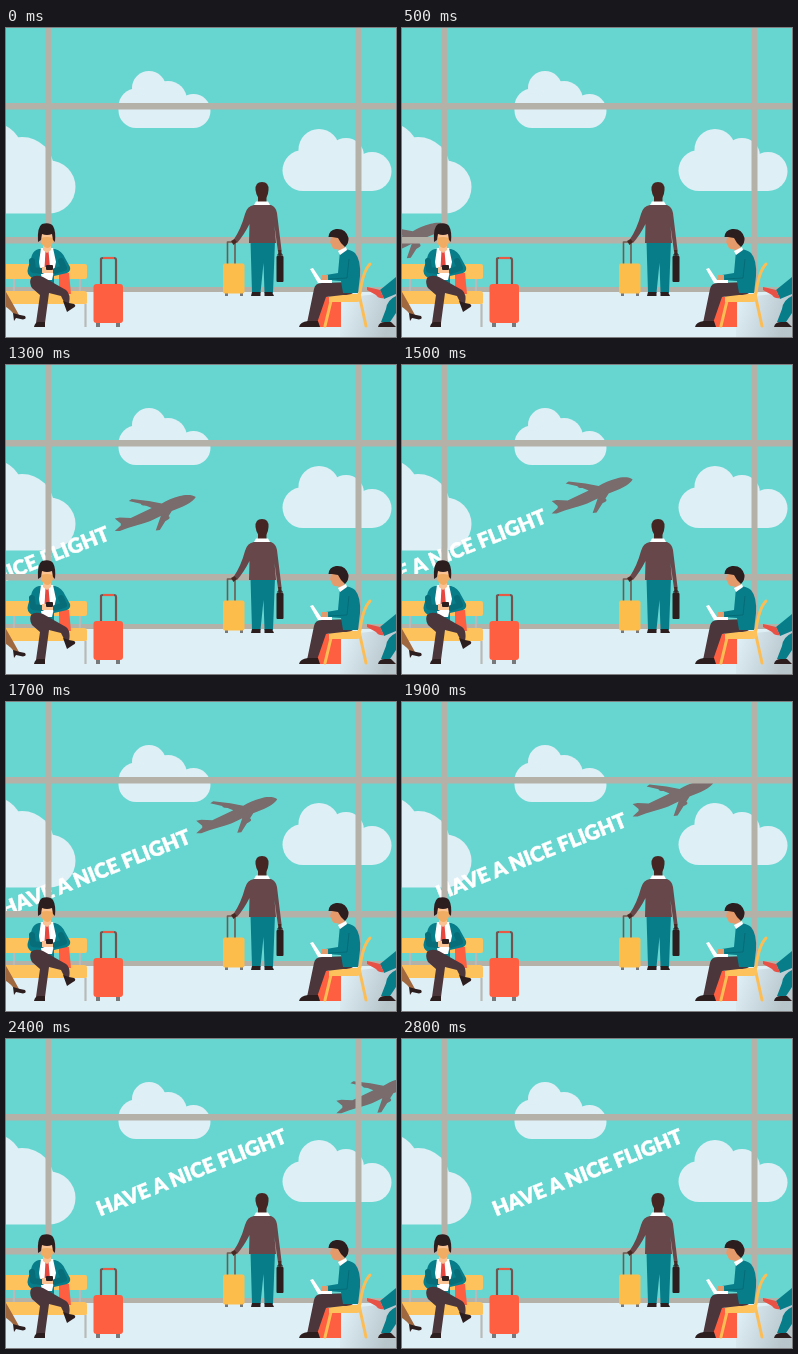
These frames come from a looping animation (390 px wide and 309 px high, 3100 ms). An HTML page:

```html
<!DOCTYPE html>
<html lang="en">
<head>
<meta charset="utf-8">
<title>Have a nice flight</title>
<style>
  html, body { margin: 0; width: 100%; height: 100%; overflow: hidden; background: #67d6d0; }
  svg { display: block; width: 390px; height: 309px; }
  .cloud { fill: #dfeff6; }
  .teal { fill: #087d8a; }
  .dark { fill: #2c1d1f; }
  .brown { fill: #4b363b; }
  .skin { fill: #fac293; }
  .tan { fill: #e59a6c; }
  .white { fill: #fff; }
  .red { fill: #ff5f41; }
  .yellow { fill: #fdc25c; }
  .line { fill: none; stroke-linejoin: round; }
  #slogan text { font: 900 20.5px Lato, "Open Sans", sans-serif; fill: #fff; stroke: #fff; stroke-width: .5px; }
</style>
</head>
<body>
<svg viewBox="0 0 390 309">
  <defs>
    <linearGradient id="shade" x1="0" y1="0" x2="1" y2=".3">
      <stop offset=".1" stop-color="#aebcc1" stop-opacity="0"/>
      <stop offset="1" stop-color="#aebcc1" stop-opacity=".8"/>
    </linearGradient>
  </defs>
  <rect width="390" height="309" fill="#67d6d0"/>

  <g class="cloud">
    <circle cx="-13" cy="124.500" r="29.500"/><circle cx="16" cy="141" r="32"/>
    <circle cx="43" cy="159" r="26.500"/><path d="M-5 130H43V185.500H-5Z"/>
    <circle cx="143" cy="60" r="17"/><circle cx="162" cy="72" r="19"/>
    <circle cx="130.500" cy="78.500" r="18"/><circle cx="130" cy="82.500" r="17.500"/>
    <circle cx="187.500" cy="83" r="17"/><path d="M130 70H187V100H130Z"/>
    <circle cx="313" cy="121.500" r="20.500"/><circle cx="340" cy="128" r="18"/>
    <circle cx="297" cy="142.500" r="20.500"/><circle cx="366" cy="143.500" r="19.500"/><path d="M297 128H366V163H297Z"/>
  </g>

  <g id="plane" fill="#7a6b6c">
    <path d="M82 2.500C79-.5 70 0 66 1.500C59 3 53 6 48 9L35 6.500 18 4.500 15 6.500 28 9.500 38 13.500 17 23.500 6 23 1 24 7 29 7 31 1 36.500 6 36.500 14 33.500 24 30.500C34 28 40 25 47 21.500L42 36 46 35.500 58 16.500C68 13 79 8 82 2.500Z"/>
    <ellipse cx="31" cy="9" rx="4" ry="2"/>
    <ellipse cx="52" cy="24" rx="4" ry="2" transform="rotate(-22 52 24)"/>
  </g>
  <g id="slogan"><text transform="translate(94 177.500) rotate(-21.600)">HAVE A NICE FLIGHT</text></g>

  <path fill="#b4b1a9" d="M0 75H390V81.500H0ZM0 209H390V215.500H0ZM0 259H390V264.500H0ZM39.500 0H45.500V262H39.500ZM349.500 0H355.500V262H349.500Z"/>
  <rect y="264" width="390" height="45" fill="#dfeff6"/>
  <path fill="url(#shade)" d="M334 270L390 264V309H334Z"/>

  <!-- bench -->
  <path class="yellow" d="M0 236H79Q81 236 81 238V249Q81 251 79 251H0ZM0 263H78Q81 263 81 266V275Q81 276 79 276H0Z"/>
  <path class="line" stroke="#b8b9b8" stroke-width="2.200" d="M79.500 276V299M74 251V263M8 251V263"/>

  <!-- woman's leg -->
  <path fill="#a0683e" d="M0 264Q7 276 13 287L10 289Q4 281 0 279Z"/>
  <path class="dark" d="M7 285Q13 287 19 288Q21 291 17 291.500L10 290 8 293Z"/>

  <!-- man on the bench -->
  <path class="red" d="M53 245H63L65 266H53Z"/>
  <path class="teal" d="M33 221L49 221Q56 223 59 230L64 239Q65 243 61 245L48 248V260H26V250Q20 246 22 240L26 227Q28 222 33 221Z"/>
  <path class="white" d="M35 220H47L50 234 46 252H36L33 234Z"/>
  <path fill="#e7473f" d="M39.500 223H42.500L44 240 41 243 38.500 240Z"/>
  <path class="brown" d="M25 250Q29 246 37 249L60 262Q65 266 63 276L58 274 55 268 43 265 39 295H30L34 267 26 260Q23 255 25 250Z"/>
  <path class="dark" d="M28 299Q29 294 33 294H39V299ZM57 273L63 275 68 276Q71 278 67 280L61 284Z"/>
  <path class="line" stroke="#076d78" stroke-width="6" stroke-linecap="round" d="M26 233L27 242 36 243M55 233L58 240 49 243"/>
  <path class="skin" d="M36 239H47V245H36ZM37 214H45V222L41 225 37 222Z"/>
  <rect class="dark" x="40" y="237" width="7" height="5" rx="1"/>
  <path class="skin" d="M35 202H47V212Q46 218 41 218 36 218 35 212Z"/>
  <path fill="#f0ac62" d="M35 210Q41 208 47 210V214Q45 220 41 220 37 219 35 214Z"/>
  <path class="dark" d="M32 214Q31 199 36 196 44 194 47 198 50 203 49 214L47 212 46 206Q41 208 36 206L35 212Z"/>

  <!-- red suitcase -->
  <path class="line" stroke="#74534f" stroke-width="2.200" d="M95 257V231Q95 230 97 230H108Q110 230 110 232V257"/>
  <path stroke="#e85a43" stroke-width="2.200" d="M97 230H108"/>
  <path fill="#77787a" d="M90 294H94V299H90ZM110 294H114V299H110Z"/>
  <rect class="red" x="87.500" y="256" width="29.500" height="39" rx="3"/>

  <!-- yellow suitcase -->
  <path class="line" stroke="#6f5a50" stroke-width="1.600" d="M221.500 236V214H229V236"/>
  <path fill="#77787a" d="M219 264H222V268H219ZM234 264H237V268H234Z"/>
  <rect x="217" y="235.500" width="21.500" height="30" rx="2" fill="#fdbd4b"/>

  <!-- standing man -->
  <path class="teal" d="M244.500 213H269L267 265H258.500L257.500 235 254.500 265H246Z"/>
  <path class="dark" d="M246 264H254.500V268H245ZM258.500 264H266L268 268H258.500Z"/>
  <path fill="#674749" d="M248 177H265Q270 179 271 185L275.500 222 272 223.500 268.500 198 270 215H243L243.500 196Q238 207 231 215L227.500 212Q235 201 239 186 241 178 248 177Z"/>
  <path fill="#4a2822" d="M225 213L228.500 211 231 214 227.500 217ZM272 222H275.500V228H272.500ZM252 165H260.500V175H252Z"/>
  <path class="white" d="M250 173.500H262L264 177H248Z"/>
  <path fill="#462622" d="M249.500 162Q249 154 256 154 263 154 262.500 162 262 170 256.500 173 250.500 170 249.500 162Z"/>
  <path class="line" stroke="#2b2024" d="M272 230V226H276V230"/>
  <rect class="dark" x="270.500" y="228" width="7" height="26" rx="1"/>

  <!-- man with laptop -->
  <path class="red" d="M311 269H335V299H311Z"/>
  <path class="line" stroke="#ff5f41" stroke-width="1.500" d="M318 270V264H328V270"/>
  <path class="line" stroke="#fdbd55" stroke-width="3" stroke-linecap="round" d="M364 236Q357 243 354 265M325 273L319 298M353 266L360 298"/>
  <path class="yellow" d="M323 266H355V271Q354 274 351 274H323Z"/>
  <path class="brown" d="M347 254V265Q344 267 337 267L320 269 311 295H301L308 261Q309 255 316 255Z"/>
  <path class="dark" d="M293 299Q294 294 302 293H312L314 299Z"/>
  <path class="teal" d="M334 223Q342 219 349 225 355 232 354 248L352 265H337L335 253 320 252 320 247 332 245Z"/>
  <path class="line" stroke="#056c77" stroke-width="1" d="M343 231L341 250 323 251"/>
  <path class="white" d="M304 241L307 240 315 252H326V255H312Z"/>
  <path class="tan" d="M316 247L322 247V252H315ZM326 207L337 209 339 221 334 225 332 221Q327 222 326 218L324 214Z"/>
  <path class="white" d="M332 223L340 219 341 222 334 227Z"/>
  <path class="dark" d="M322.500 209Q323 202 330 201 340 200 342.500 210 343 215 339 219L335 215 332 210 326 209Z"/>

  <!-- passenger at the edge -->
  <path class="teal" d="M390 249L374 262 378 271 390 266ZM390 268Q381 272 380 281L375 294H384L390 285Z"/>
  <path fill="#e85145" d="M361 259Q366 260 374 262L378 270Q373 271 370 267L361 262Z"/>
  <path class="dark" d="M372 299Q373 294 379 294H385L390 299Z"/>
</svg>
<script>
  const LOOP = 3100, STEP = 100;
  const plane = document.getElementById("plane");
  const slogan = document.getElementById("slogan");
  const start = performance.now();

  const glide = (from, speed, drag, n) => from + speed * n + drag * n * n;
  const move = (el, x, y) => el.setAttribute("transform", `translate(${x} ${y})`);

  function draw(now) {
    const tick = Math.floor(Math.max(0, now - start) % LOOP / STEP);
    const n = tick < 8 ? tick - 8 : tick - 9; // one tick of rest at 800 ms
    move(plane, glide(25.3, 20.75, -.032, n), glide(166, -9.3, .05, n));
    move(slogan, Math.min(0, glide(-261, 21.2, -.072, n)), Math.max(0, glide(107, -9.1, .05, n)));
    requestAnimationFrame(draw);
  }
  draw(start);
</script>
</body>
</html>
```
